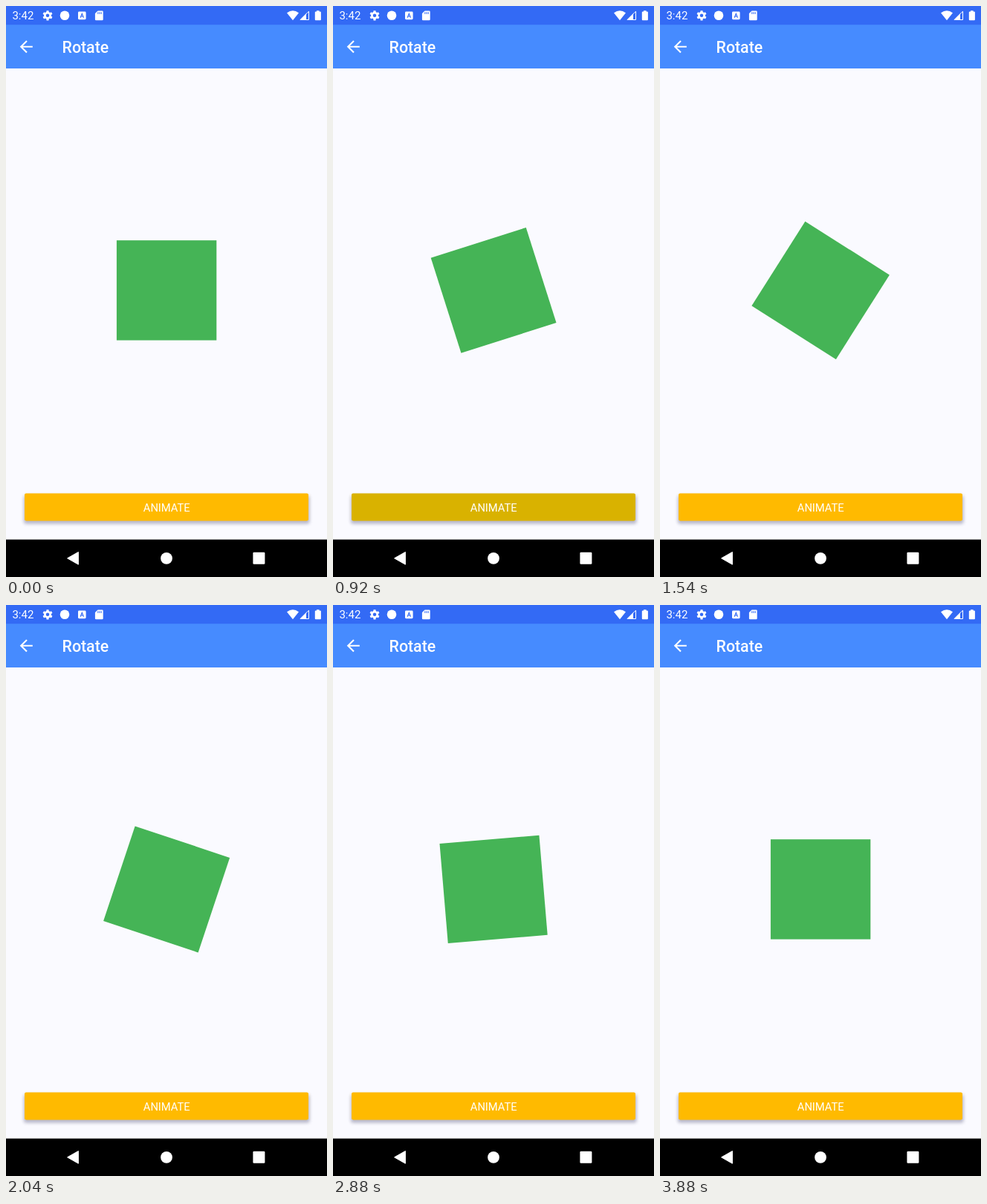
Write an HTML page that moves like this. It is 432 by 768 pixels and loops after 3.92 s.

```html
<!DOCTYPE html>
<html lang="en">
<head>
<meta charset="utf-8">
<title>Rotate</title>
<style>
  html, body { margin: 0; width: 100%; height: 100%; overflow: hidden; background: #fafaff; }
  svg { display: block; width: 100%; height: 100%; }
  text { font-family: Roboto, sans-serif; fill: #fff; }
</style>
</head>
<body>
<svg viewBox="0 0 432 768" xmlns="http://www.w3.org/2000/svg">
  <defs>
    <filter id="soft" x="-5%" y="-40%" width="110%" height="200%">
      <feGaussianBlur stdDeviation="2"/>
    </filter>
  </defs>

  <rect width="432" height="768" fill="#fafaff"/>
  <rect width="432" height="84" fill="#468bff"/>
  <rect width="432" height="25.2" fill="#336af5"/>

  <!-- status bar -->
  <g fill="#fff">
    <text x="8.4" y="18.4" font-size="15">3:42</text>
    <g transform="translate(56 12.8)">
      <circle r="3.6" fill="none" stroke="#fff" stroke-width="2.7"/>
      <g id="teeth"></g>
    </g>
    <circle cx="79" cy="12.8" r="6.3"/>
    <rect x="97" y="7.6" width="10.6" height="10.6" rx="1.4"/>
    <path d="M100.1 15.7L102.3 10.2L104.5 15.7M101 14H103.6" fill="none" stroke="#336af5" stroke-width="1.1"/>
    <path d="M123.6 6.4H129.4Q130.7 6.4 130.7 7.7V17.9Q130.7 19.2 129.4 19.2H121.2Q119.9 19.2 119.9 17.9V10.1Z"/>
    <path d="M123.8 8.2V10.7M126 8.2V10.7M128.2 8.2V10.7" stroke="#336af5" stroke-width="1.1"/>
    <path d="M378 9.2Q386 3.2 394 9.2L386 19.2Z"/>
    <path d="M407.5 7.2V18.5H396.2Z" fill="none" stroke="#fff"/>
    <path d="M404 10.3V18.8H395.5Z"/>
    <path d="M418 6.2H421.6V7.4H422.9Q423.9 7.4 423.9 8.4V18.2Q423.9 19.2 422.9 19.2H416.8Q415.8 19.2 415.8 18.2V8.4Q415.8 7.4 416.8 7.4H418Z"/>
  </g>

  <!-- title bar -->
  <path d="M35.8 54.8H20.8M28 47L20.2 54.8L28 62.6" fill="none" stroke="#fff" stroke-width="2.1"/>
  <text x="75.6" y="63" font-size="21.3" font-weight="500">Rotate</text>

  <rect id="box" x="-67.2" y="-67.2" width="134.4" height="134.4" fill="#45b456"/>

  <!-- button -->
  <rect x="24" y="658.6" width="384.5" height="38" rx="3" fill="#5a5a80" opacity=".42" filter="url(#soft)"/>
  <rect id="btn" x="25" y="655.4" width="382" height="37" rx="2.1"/>
  <text x="216.2" y="679.8" font-size="14.7" text-anchor="middle">ANIMATE</text>

  <!-- navigation bar -->
  <rect y="717.6" width="432" height="50.4" fill="#000"/>
  <g fill="#fff">
    <path d="M82.6 742.8L97.4 734.4V751.2Z" stroke="#fff" stroke-linejoin="round"/>
    <circle cx="216" cy="742.9" r="7.9"/>
    <rect x="332.4" y="734.8" width="16" height="16" rx="1.3"/>
  </g>
</svg>
<script>
  const LOOP = 3920, STEP = 1000 / 24;
  const START = 775.4, TURN = 703, TURNS = 3;
  const IDLE = [255, 186, 0], PRESSED = [217, 178, 0];
  const $ = id => document.getElementById(id);
  const clamp = v => Math.min(1, Math.max(0, v));
  const ramp = (t, a, b) => clamp((t - a) / (b - a));

  $('teeth').innerHTML = Array.from({ length: 6 }, (_, i) =>
    `<rect x="-1.6" y="-6.6" width="3.2" height="3" rx=".4" transform="rotate(${i * 60})"/>`).join('');

  function draw(ms) {
    // the picture advances 24 times per second
    const t = Math.floor((ms % LOOP + 4) / STEP) * STEP;
    const turns = Math.min(TURNS, Math.max(0, (t - START) / TURN));
    $('box').setAttribute('transform', `translate(216.1 382.4) rotate(${turns % 1 * 360})`);

    const press = ramp(t, 640, 760) * (1 - ramp(t, 940, 1190));
    const mix = IDLE.map((c, i) => Math.round(c + (PRESSED[i] - c) * press));
    $('btn').setAttribute('fill', `rgb(${mix})`);
  }

  const origin = performance.now();
  function tick() {
    draw(performance.now() - origin);
    requestAnimationFrame(tick);
  }
  tick();
</script>
</body>
</html>
```
